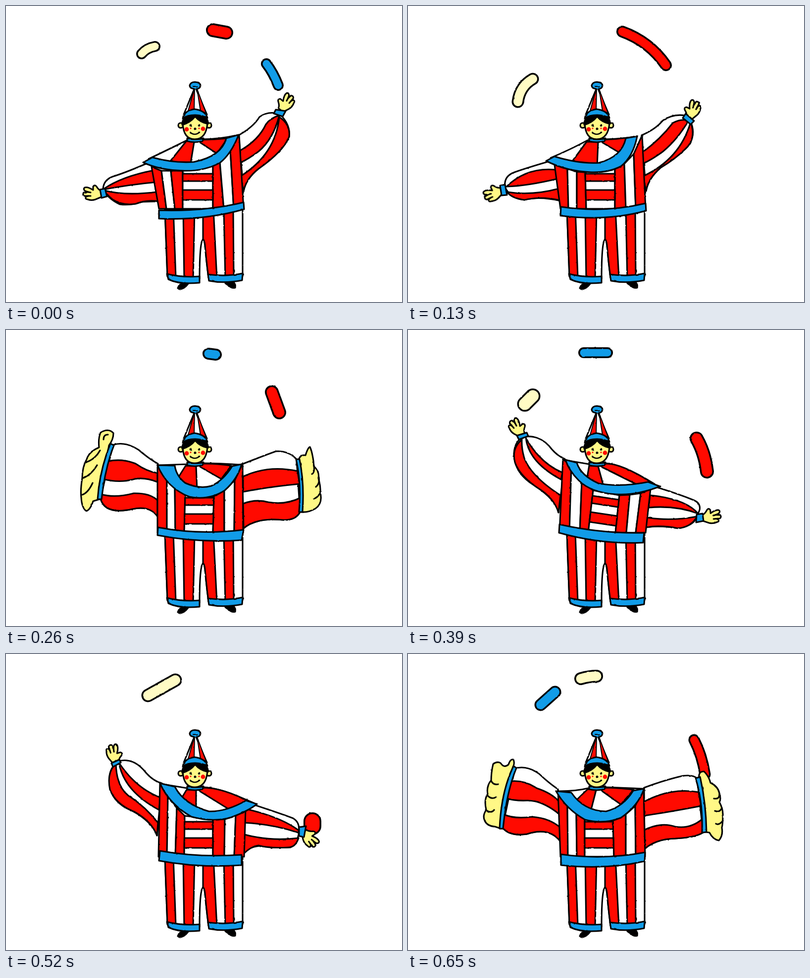
Recreate the animation shown at these times as an HTML page. Size 800 by 600 pixels, loop 780 ms.

```html
<!DOCTYPE html>
<html>
<head>
<meta charset="utf-8">
<title>Juggling clown</title>
<style>
html, body { margin: 0; height: 100%; overflow: hidden; background: #fff; }
svg { display: block; width: 100%; height: 100%; }
path, circle, ellipse { stroke: #000; stroke-width: 3.1; stroke-linejoin: round; stroke-linecap: round; }
</style>
</head>
<body>
<svg viewBox="0 0 800 600">
  <filter id="ink" filterUnits="userSpaceOnUse" x="0" y="0" width="800" height="600" color-interpolation-filters="sRGB">
    <feTurbulence type="fractalNoise" baseFrequency=".12" numOctaves="2" result="noise"/>
    <feDisplacementMap in="SourceGraphic" in2="noise" scale="2" xChannelSelector="R" yChannelSelector="G"/>
  </filter>
  <g id="stage" filter="url(#ink)"></g>
</svg>
<script>
const RED = '#ff0a00', BLUE = '#119ce8', SKIN = '#fff886', CREAM = '#fffbc4', WHITE = '#fff';
const STEP = 130;

const path = (d, fill = 'none', extra = '') => `<path d="${d}" fill="${fill}" ${extra}/>`;
const dot = (x, y, r, fill) => `<circle cx="${x}" cy="${y}" r="${r}" fill="${fill}" style="stroke:none"/>`;
const ear = x => `<circle cx="${x}" cy="242" r="5" fill="${SKIN}"/>`;
const mix = (a, b, t) => a + (b - a) * t;

// Rounded club: a thick black line with a thinner coloured one on it
const club = ([color, d, width]) =>
  path(d, 'none', `style="stroke-width:${width}"`) +
  path(d, 'none', `style="stroke:${color};stroke-width:${width - 7}"`);

// Open hand with the wrist at x, y; side -1 mirrors it
const hand = ([x, y, turn, side]) =>
  `<g transform="translate(${x} ${y}) scale(${side} 1) rotate(${turn})">` +
  path('M0-6Q6-8 10-15Q14-20 17-15L17-8Q28-15 34-13Q38-10 33-6L27-4L36-3Q39 1 35 4L27 4L32 6Q33 11 28 11Q20 14 12 11Q5 8 0 6Z', SKIN) +
  path('M27-4L22-3M27 4L22 4') + '</g>';

// Eight seams run down the jacket; each even one starts a red stripe
function torso({ top, base, skew = 0 }) {
  const floor = 411;
  const seam = i => [top[2 * i], top[2 * i + 1], base[i], floor];
  const strip = (i, j, fill) => {
    const [a, b, c, d] = seam(i), [e, f, g, h] = seam(j);
    return path(`M${a} ${b}L${e} ${f}L${g} ${h}L${c} ${d}Z`, fill);
  };
  const at = (i, y) => {
    const [x, y0, x1, y1] = seam(i);
    return `${mix(x, x1, (y - y0) / (y1 - y0))} ${y}`;
  };
  const row = (a, b) =>
    path(`M${at(3, a - skew)}L${at(4, a + skew)}L${at(4, b + skew)}L${at(3, b - skew)}Z`, RED);
  let out = '';
  for (let i = 0; i < 7; i++) out += strip(i, i + 1, i % 2 ? WHITE : RED);
  return out + row(340, 355) + row(373, 393);
}

const legs =
  path('M347 572Q350 562 362 561L368 563Q360 574 350 574Z', '#000') +
  path('M443 562L458 558Q465 564 463 571Q456 573 450 567Z', '#000') +
  path('M321 412L326 548Q358 558 391 553Q391 505 394 485Q398 461 402 485Q405 520 409 550Q445 556 478 548L478 412Z', WHITE) +
  path('M321 412L326 547L343 550L338 412ZM358 412L360 553L378 553L381 412Z' +
    'M398 412L398 473Q401 474 402 485Q405 520 409 550L426 552L419 412ZM440 412L443 552L460 550L459 412Z', RED) +
  path('M325 543Q358 551 391 548L391 561Q350 565 328 554ZM408 544Q445 549 478 542L477 556Q440 563 410 557Z', BLUE);

const head =
  path('M366 268Q382 273 399 268L397 274Q382 278 366 274Z', BLUE) +
  ear(353) + ear(410) +
  path('M357 236Q358 270 381 270Q405 270 407 236Q395 215 381 218Q365 218 357 236Z', SKIN) +
  path('M356 241Q355 227 370 222Q382 218 396 222Q409 227 408 239Q392 236 382 224Q373 236 356 241Z', '#000') +
  path('M382 164L359 220L406 220Z', WHITE) +
  path('M381 166L367 216L380 213ZM386 168L393 213L404 217Z', RED, 'style="stroke-width:2"') +
  path('M357 228Q360 212 381 209Q403 212 407 227Q395 221 382 221Q366 221 357 228Z', BLUE) +
  path('M380 168Q371 167 371 161Q373 154 382 154Q393 155 393 162Q391 168 385 168', BLUE) +
  path('M378 163L387 163', 'none', 'style="stroke-width:2"') +
  dot(373, 242, 2.4, '#000') + dot(390, 242, 2.4, '#000') + dot(382, 249, 2.5, '#000') +
  dot(365, 250, 4.4, RED) + dot(398, 249, 4.4, RED) + dot(373, 248, 1.6, RED) + dot(390, 248, 1.6, RED) +
  path('M372 256Q381 264 391 256', 'none', 'style="stroke-width:2.6"');

const poses = [
  {
    clubs: [[CREAM, 'M274 97Q284 85 301 82', 22], [RED, 'M418 49L445 54', 28], [BLUE, 'M526 117Q540 135 550 161', 22]],
    sleeves: 'M300 312Q250 335 215 346Q197 353 196 371Q205 390 230 402Q250 405 275 397L309 396Z' +
      'M470 262Q500 245 512 225Q530 212 553 219Q575 240 572 265Q560 295 510 330Q485 350 480 375Z',
    stripes: 'M197 371Q235 345 299 333L304 357Q250 362 197 372ZM199 374Q240 385 305 377L308 396Q285 392 262 401Q235 405 215 392Q203 382 199 374Z' +
      'M473 293Q510 272 525 240Q535 226 552 222Q540 270 510 295Q490 310 473 318ZM474 345Q545 300 552 225Q575 240 572 265Q560 295 510 330Q485 350 480 375Z',
    cuffs: 'M190 372L200 370L204 386L193 389ZM545 210L565 213L559 224L541 218Z',
    hands: [[193, 381, 0, -1], [555, 211, -50, 1]],
    top: [294, 326, 314, 334, 333, 334, 357, 334, 418, 325, 432, 316, 453, 290, 471, 262],
    base: [309, 324, 341, 357, 418, 440, 460, 480],
    belt: 'M309 414Q400 417 480 398L481 412Q400 435 309 431Z',
    yoke: 'M288 310Q330 290 366 272L398 270Q430 270 466 262L435 300L380 325Z',
    wedges: 'M365 273L326 322L372 325L380 276ZM388 274L426 299L448 268Q420 271 398 271Z',
    collar: 'M277 317L296 307Q340 319 380 316Q435 305 445 268L470 261Q455 300 432 318Q400 335 360 334Q310 333 277 317Z'
  },
  {
    clubs: [[CREAM, 'M222 194Q226 163 252 148', 25], [RED, 'M433 52Q488 72 521 120', 24]],
    sleeves: 'M295 312Q240 328 215 337Q193 345 196 367Q205 388 235 393Q265 385 308 395Z' +
      'M472 262Q500 250 515 232Q535 218 560 222L570 232Q585 265 560 290Q540 310 510 328Q485 350 481 375Z',
    stripes: 'M199 366Q240 326 299 332L303 350Q240 365 199 366ZM200 377Q250 385 305 370L308 394Q270 385 235 393Q210 390 200 377Z' +
      'M473 297Q510 270 535 237Q552 228 567 232Q545 270 515 295Q495 310 474 320ZM475 345Q550 310 571 235Q583 270 560 290Q540 310 510 328Q485 350 481 375Z',
    cuffs: 'M186 364L196 362L200 383L189 384ZM561 218L578 233L571 240L555 227Z',
    hands: [[189, 374, 25, -1], [568, 227, -62, 1]],
    top: [296, 322, 322, 330, 341, 336, 358, 337, 418, 330, 437, 320, 456, 300, 473, 262],
    base: [308, 324, 341, 360, 418, 440, 460, 480],
    belt: 'M309 407Q395 420 480 400L481 415Q400 437 308 425Z',
    yoke: 'M288 308Q330 290 363 272L398 270Q430 270 462 264L435 305L380 328Z',
    wedges: 'M361 275L328 320L382 326L384 276ZM388 274L430 299L444 267Q420 270 398 271Z',
    collar: 'M279 314L296 305Q345 320 385 318Q432 306 440 268L463 264Q455 305 430 325Q405 338 370 337Q320 335 279 314Z'
  },
  {
    clubs: [[BLUE, 'M409 48L424 50', 24], [RED, 'M537 126L552 167', 28]],
    sleeves: 'M216 233Q240 225 268 243Q290 262 307 271L307 378Q290 355 255 363Q200 375 191 342Z' +
      'M477 272Q520 255 545 246Q570 244 587 262L594 369Q585 386 560 385Q505 380 480 402Z',
    stripes: 'M206 266Q235 260 262 271Q285 287 306 290L306 308Q280 298 260 302Q230 311 196 302Z' +
      'M192 333Q220 341 258 331Q290 330 306 345L306 378Q290 355 255 363Q200 375 191 342Z' +
      'M479 297Q530 273 589 286L593 312Q530 318 479 328ZM479 352Q505 342 530 349Q565 355 595 340L594 369Q585 386 560 385Q505 380 480 402Z',
    palms: 'M208 234Q217 222 217 209Q207 198 191 208Q186 220 188 238Q168 246 163 262Q154 278 154 300Q150 325 152 340Q153 360 162 367Q170 365 176 347L189 343Z' +
      'M591 264Q594 252 605 254Q610 238 614 237Q618 245 621 265L622 276Q634 288 631 300Q636 318 635 330Q640 352 625 362Q612 370 597 369Z',
    lines: 'M197 222Q197 212 206 212M162 268Q180 262 190 244M156 300Q172 294 184 274M154 334Q166 330 175 310' +
      'M622 275Q624 290 618 292M632 298Q634 312 626 318M636 328Q630 340 622 342',
    cuffs: 'M211 230L218 234Q200 280 193 343L185 343Q189 285 211 230ZM586 262L593 262Q603 310 599 369L592 369Q597 310 586 262Z',
    top: [306, 272, 325, 300, 341, 318, 362, 332, 420, 338, 441, 325, 462, 305, 478, 270],
    base: [306, 325, 342, 360, 418, 441, 461, 479],
    belt: 'M307 400Q390 416 480 405L476 426Q390 432 306 416Z',
    yoke: 'M310 274L366 272L398 270Q430 270 473 273L440 320L370 325Z',
    wedges: 'M363 275L346 302L386 325L384 276ZM388 275L435 302L455 275Q420 270 398 271Z',
    collar: 'M306 274Q325 320 370 338Q410 346 442 325Q468 302 476 272L457 276Q440 304 415 316Q390 323 362 310Q344 296 341 275Z'
  },
  {
    clubs: [[BLUE, 'M355 46L403 46', 22], [CREAM, 'M236 150L252 134', 31], [RED, 'M583 220Q600 250 604 287', 28]],
    sleeves: 'M236 216Q265 213 285 235Q300 255 318 262L304 370Q300 345 255 315Q214 290 214 250Q216 222 236 216Z' +
      'M490 315Q540 330 575 344Q592 350 589 365L583 380Q575 400 540 401Q505 396 480 400Z',
    stripes: 'M230 222Q209 240 216 268Q225 295 262 320Q295 340 304 370L308 335Q250 298 235 260Q229 240 230 222Z' +
      'M238 219Q244 268 309 303L312 289Q267 270 238 219ZM489 335Q560 342 586 372Q540 355 486 360Z' +
      'M482 380Q530 388 584 378Q572 400 545 402Q510 395 481 400Z',
    cuffs: 'M220 214L240 208L243 215L224 222ZM583 374L595 372L597 387L582 390Z',
    hands: [[231, 213, -50, -1], [595, 381, -5, 1]],
    top: [313, 262, 330, 275, 351, 308, 374, 325, 427, 335, 448, 334, 470, 331, 490, 322],
    base: [306, 326, 347, 364, 419, 441, 460, 480],
    skew: 4,
    belt: 'M306 394Q390 413 477 411L475 431Q390 435 305 411Z',
    yoke: 'M325 265L366 272L398 270Q430 270 498 312L430 325L365 312Z',
    wedges: 'M366 275L361 304L396 320L384 276ZM388 276L470 317L492 309Q430 270 400 271Z',
    collar: 'M318 263L341 269Q349 295 385 311Q430 319 485 308L509 317Q460 336 420 333Q370 330 345 305Q325 285 318 263Z'
  },
  {
    clubs: [[CREAM, 'M287 84L342 53', 27], [RED, 'M619 339L619 349', 36]],
    sleeves: 'M228 217Q255 210 278 235Q295 257 315 262L305 368Q295 340 255 318Q210 300 209 260Q207 230 228 217Z' +
      'M484 300Q560 325 580 333Q592 340 592 355Q592 380 575 392Q540 394 515 389Q490 390 480 405Z',
    stripes: 'M222 222Q203 240 210 275Q222 305 260 320Q295 340 305 368L307 342Q280 308 247 287Q223 268 222 222Z' +
      'M228 220Q238 278 309 316L312 291Q262 272 228 220ZM484 314Q555 330 592 358L590 362Q540 345 482 342Z' +
      'M482 366Q535 380 591 373Q585 392 570 392Q530 394 510 388Q495 390 480 405Z',
    cuffs: 'M213 221L229 214L232 220L216 229ZM592 351L606 349L602 371L592 369Z',
    hands: [[222, 220, -72, -1], [602, 360, 54, 1]],
    top: [311, 262, 327, 290, 345, 312, 361, 328, 418, 335, 442, 335, 464, 328, 484, 314],
    base: [308, 325, 342, 360, 418, 441, 461, 481],
    belt: 'M311 399Q390 413 476 407L476 428Q390 434 309 419Z',
    yoke: 'M318 264L366 272L398 270Q430 270 498 301L430 328L365 312Z',
    wedges: 'M365 275L350 300L384 322L384 276ZM388 276L454 317L490 299Q440 272 400 271Z',
    collar: 'M311 262L341 269Q360 305 410 319Q445 320 485 297L507 304Q490 318 455 331Q420 342 375 330Q330 305 311 262Z'
  },
  {
    clubs: [[BLUE, 'M268 103L297 77', 25], [CREAM, 'M349 50Q366 45 381 45', 26], [RED, 'M578 174Q594 205 600 244', 23]],
    sleeves: 'M216 232Q240 225 265 243Q285 262 303 274L308 380Q285 350 240 365Q205 370 191 352Z' +
      'M477 271Q520 255 555 247Q575 244 584 252L596 362Q580 372 540 374Q500 375 478 395Z',
    stripes: 'M206 258Q235 255 260 272Q290 282 304 298L306 325Q270 296 240 297Q215 298 197 292Z' +
      'M193 325Q215 335 250 330Q285 332 308 352L308 380Q285 350 240 365Q205 370 191 352Z' +
      'M476 300Q530 270 587 280L592 308Q530 320 476 328ZM477 357Q510 340 540 350Q570 355 594 335L596 362Q580 372 540 374Q500 375 478 395Z',
    palms: 'M212 229Q216 222 213 214Q207 212 203 224Q194 232 187 221Q180 217 172 223Q168 240 168 256Q158 268 161 284Q153 295 158 316Q150 328 155 338Q160 349 176 350L188 354Z' +
      'M588 252Q586 238 598 238Q608 248 611 261Q626 268 629 282Q633 295 629 300Q637 315 636 328Q636 345 634 352Q637 368 628 378Q616 376 609 362L602 361Z',
    lines: 'M168 257Q172 266 182 264M160 286Q168 296 178 290M157 316Q168 324 174 316' +
      'M629 283Q630 295 618 293M634 312Q630 322 620 318M636 338Q628 348 622 344',
    cuffs: 'M213 227L219 231Q199 280 192 354L185 354Q188 280 213 227ZM581 252L590 249Q602 300 603 361L594 362Q596 300 581 252Z',
    top: [303, 276, 322, 305, 340, 322, 357, 335, 414, 338, 440, 325, 459, 308, 476, 272],
    base: [308, 323, 341, 357, 416, 440, 460, 479],
    belt: 'M309 406Q395 418 479 402L478 420Q400 438 309 428Z',
    yoke: 'M306 278Q340 278 364 272L398 270Q430 271 473 273L435 318L360 325Z',
    wedges: 'M363 274L334 302L368 323L380 276ZM388 275L430 305L456 275Q420 271 398 271Z',
    collar: 'M299 278Q320 315 358 336Q395 346 430 332Q465 308 477 273L455 277Q435 310 400 319Q355 318 330 281Z'
  }
];

const draw = p =>
  p.clubs.map(club).join('') +
  path(p.sleeves, WHITE) + path(p.stripes, RED) +
  (p.hands ? p.hands.map(hand).join('') : path(p.palms, SKIN) + path(p.lines)) +
  path(p.cuffs, BLUE) +
  legs + torso(p) + path(p.belt, BLUE) +
  path(p.yoke, WHITE) + path(p.wedges, RED) + path(p.collar, BLUE) +
  head;

const stage = document.getElementById('stage');
const start = performance.now();
let shown = -1;

function tick() {
  const i = Math.floor((performance.now() - start) / STEP) % poses.length;
  if (i !== shown) stage.innerHTML = draw(poses[shown = i]);
  requestAnimationFrame(tick);
}
tick();
</script>
</body>
</html>
```
